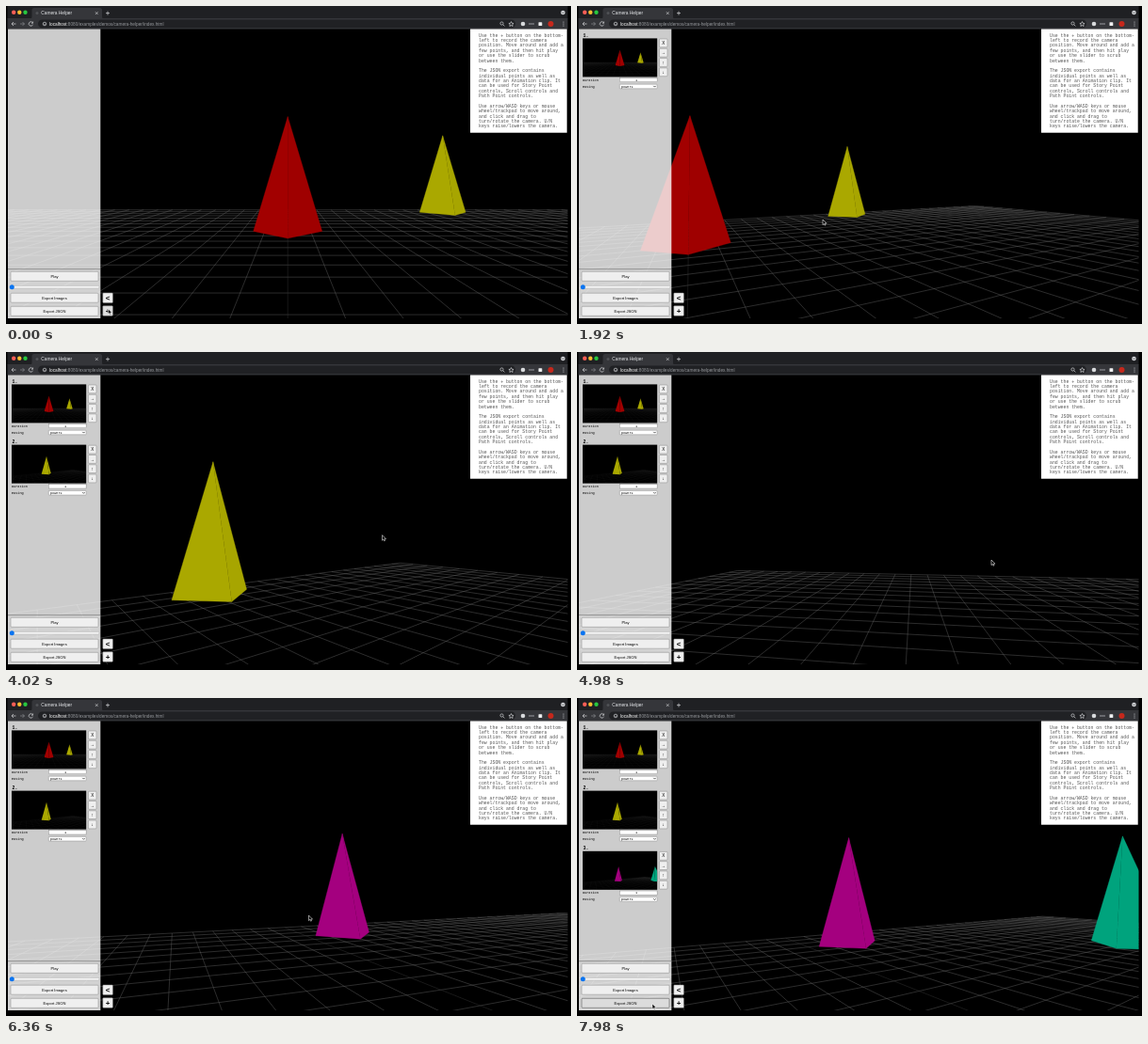
An HTML page for the animation above (8000 ms loop, 600 by 338 pixels).

```html
<!DOCTYPE html>
<html lang="en">
<head>
<meta charset="utf-8">
<title>Camera Helper</title>
<style>
  html, body { margin: 0; width: 100%; height: 100%; overflow: hidden; background: #000; }
  svg { display: block; width: 100vw; height: 100vh; }
  text { font-family: "Liberation Sans", Arial, sans-serif; white-space: pre; }
  .mono { font-family: "Liberation Mono", "Courier New", monospace; }
  .mid { text-anchor: middle; }
  .grid { fill: none; stroke: #636363; stroke-width: .45; }
  .axis { fill: none; stroke: #363636; stroke-width: .45; }
  .btn { fill: #efefef; stroke: #858585; stroke-width: .5; }
  .icon { fill: none; stroke: #d4d6d9; stroke-width: .7; }
</style>
</head>
<body>
<svg id="stage" viewBox="0 0 600 338">
  <defs>
    <clipPath id="view"><rect x="2" y="24.500" width="594.500" height="307.500"/></clipPath>
  </defs>
  <rect width="600" height="338" fill="#000"/>
  <g id="scene" clip-path="url(#view)"></g>

  <g id="chrome">
    <rect x="1.500" y="0" width="595" height="13.500" fill="#1f2023"/>
    <path d="M25 14Q27.500 14 27.500 11V4.500Q27.500 2 30 2H99.500Q102 2 102 4.500V11Q102 14 104.500 14Z" fill="#35363a"/>
    <rect x="1.500" y="13" width="595" height="11.500" fill="#35363a"/>
    <rect x="34" y="14.400" width="507" height="8.800" rx="4.400" fill="#202124"/>
    <circle cx="8.200" cy="6.700" r="2.200" fill="#ff5f57"/>
    <circle cx="14.300" cy="6.700" r="2.200" fill="#febc2e"/>
    <circle cx="20.500" cy="6.700" r="2.200" fill="#28c840"/>
    <circle cx="33" cy="7.500" r="1.500" fill="#505256"/>
    <text x="37.300" y="9.300" font-size="4.850" fill="#e8eaed">Camera Helper</text>
    <path class="icon" d="M95 6.300l2.600 2.600M97.600 6.300l-2.600 2.600M106 7.600h4M108 5.600v4"/>
    <path class="icon" d="M10.500 19h-4.500m2-2l-2 2 2 2M28.300 17.800a2.200 2.200 0 1 0 .2 1.900M28.600 16.500v1.700h-1.700"/>
    <path class="icon" stroke-opacity=".5" d="M15 19h4.500m-2-2l2 2-2 2"/>
    <circle class="icon" cx="41" cy="19" r="1.800"/>
    <path class="icon" d="M41 18.800v1.300"/>
    <text x="46" y="20.700" font-size="4.720" fill="#94979b"><tspan fill="#fff">localhost</tspan>:8080/examples/demos/camera-helper/index.html</text>
    <circle class="icon" cx="526.500" cy="18.500" r="1.600"/>
    <path class="icon" d="M527.700 19.700l1.700 1.700M536.500 16.600l.8 1.700 1.800.2-1.400 1.200.4 1.800-1.600-.9-1.600.9.4-1.800-1.400-1.200 1.800-.2Z"/>
    <circle cx="549" cy="19" r="2.300" fill="#d8dadc"/>
    <g fill="#c4c6c9">
      <circle cx="556" cy="19" r=".7"/><circle cx="558" cy="19" r=".7"/><circle cx="560" cy="19" r=".7"/>
      <circle cx="592" cy="17" r=".6"/><circle cx="592" cy="19" r=".6"/><circle cx="592" cy="21" r=".6"/>
    </g>
    <rect x="565.500" y="17.200" width="3.800" height="3.800" rx=".6" fill="#f0f1f2"/>
    <circle cx="578.500" cy="19" r="3" fill="#c6281c"/>
    <circle cx="591.500" cy="7" r="2.300" fill="#d0d2d5"/>
    <path d="M590.700 6.700l.8.8.8-.8" fill="none" stroke="#222" stroke-width=".7"/>
  </g>

  <g id="panel">
    <rect x="2" y="24.500" width="98.300" height="307.500" fill="#fff" fill-opacity=".8"/>
    <rect x="2" y="280" width="98.300" height="52" fill="#fff" fill-opacity=".12"/>
    <path d="M2 279.700H100.300" stroke="#666" stroke-width=".6"/>
    <rect x="5" y="297.400" width="94" height="2.600" rx="1.300" fill="#f4f4f4" stroke="#aaa" stroke-width=".4"/>
    <circle cx="6.300" cy="298.700" r="2.500" fill="#0a74f0"/>
  </g>
  <g id="items"></g>
  <g id="info"><rect x="493" y="24.500" width="102.700" height="110.200" fill="#fff"/></g>
  <path id="cursor" d="M0 0V5.600L1.300 4.400 2.100 6.200 3 5.800 2.200 4.100H4Z" fill="#000" stroke="#fff" stroke-width=".55"/>
</svg>

<script>
const NS = 'http://www.w3.org/2000/svg';
const $ = id => document.getElementById(id);
const LOOP = 8000, STEP = 60;
const FOCAL = 329, CX = 299.2, CY = 178.5, EYE = 5, RADIUS = 3, NEAR = 0.5;

// Ground coordinates: x to the right, z ahead of the first view.
const CONES = [
  { x: 0, z: 27, rgb: [162, 0, 0] },
  { x: 20.2, z: 40.4, rgb: [170, 168, 0] },
  { x: 43.7, z: -10.9, rgb: [164, 0, 127] },
  { x: 29.4, z: -32.1, rgb: [0, 163, 125] }
];
const GRID = { x0: -50, x1: 50, z0: -57, z1: 43, gap: 2 };

// Rows: time, then values.
const POSITION = [
  [1950, 0, 0], [2790, 9.93, 18.67], [5200, 9.93, 18.67],
  [6240, 16.5, 4.84], [6400, 16.5, 4.84], [7050, 18.2, 3.9]
];
const LOOK = [ // yaw in degrees, horizon height on the stage
  [720, 0, 178.5], [1020, 8.2, 175], [1750, 28.7, 185.8], [3850, 28.6, 185.3],
  [4400, 62, 190], [4650, 62, 190], [4980, 80, 194.5], [5460, 110, 197],
  [6400, 110, 197], [7000, 122, 204]
];
const POINTER = [
  [330, 108.5, 322], [700, 373, 204], [1020, 340, 189], [1750, 261, 227],
  [2400, 261, 227], [2820, 111.5, 322], [3620, 111.5, 322], [3850, 440, 190],
  [4400, 309, 205], [4650, 510, 213], [4980, 440, 221], [5460, 321.5, 231],
  [6400, 321.5, 231], [7000, 275, 259], [7050, 275, 259], [7360, 108, 322],
  [7560, 108, 322], [7860, 80, 325]
];
const ITEMS_AT = [300, 3060, 7440];
const HOVER_AT = 7860;

const linear = u => u;
const smooth = u => u * u * (3 - 2 * u);

function track(keys, t, ease = linear) {
  if (t <= keys[0][0]) return keys[0].slice(1);
  const i = keys.findIndex(k => k[0] > t);
  if (i < 0) return keys[keys.length - 1].slice(1);
  const a = keys[i - 1], b = keys[i];
  const u = ease((t - a[0]) / (b[0] - a[0]));
  return a.slice(1).map((v, j) => v + (b[j + 1] - v) * u);
}

function el(parent, tag, attrs = {}, text) {
  const node = document.createElementNS(NS, tag);
  for (const k in attrs) node.setAttribute(k, attrs[k]);
  if (text !== undefined) node.textContent = text;
  parent.append(node);
  return node;
}

function cameraAt(t) {
  const [x, z] = track(POSITION, t, smooth);
  const [deg, horizon] = track(LOOK, t);
  const yaw = deg * Math.PI / 180, pitch = Math.atan((horizon - CY) / FOCAL);
  return { x, z, sy: Math.sin(yaw), cy: Math.cos(yaw), sp: Math.sin(pitch), cp: Math.cos(pitch) };
}

function toCamera(c, x, y, z) {
  const dx = x - c.x, dz = z - c.z;
  const ahead = dx * c.sy + dz * c.cy;
  return [dx * c.cy - dz * c.sy, y * c.cp - ahead * c.sp, ahead * c.cp + y * c.sp];
}

const project = p => [CX + FOCAL * p[0] / p[2], CY - FOCAL * p[1] / p[2]];
const pair = p => p.map(v => v.toFixed(2)).join(' ');

function groundLine(c, x0, z0, x1, z1) {
  let a = toCamera(c, x0, -EYE, z0), b = toCamera(c, x1, -EYE, z1);
  if (a[2] < b[2]) [a, b] = [b, a];
  if (a[2] <= NEAR) return '';
  if (b[2] < NEAR) {
    const u = (a[2] - NEAR) / (a[2] - b[2]);
    b = a.map((v, i) => v + (b[i] - v) * u);
  }
  return `M${pair(project(a))}L${pair(project(b))}`;
}

function gridPaths(c) {
  const { x0, x1, z0, z1, gap } = GRID;
  let lines = '', axes = '';
  for (let k = 0; k <= x1 - x0; k += gap) {
    const d = groundLine(c, x0 + k, z0, x0 + k, z1) + groundLine(c, x0, z0 + k, x1, z0 + k);
    if (k === (x1 - x0) / 2) axes = d; else lines += d;
  }
  return [lines, axes];
}

// Side faces of a four-sided cone that turn towards the camera.
function coneFaces(c, cone) {
  const apex = toCamera(c, cone.x, EYE, cone.z);
  const base = [[0, -1], [1, 0], [0, 1], [-1, 0]].map(([x, z]) =>
    toCamera(c, cone.x + x * RADIUS, -EYE, cone.z + z * RADIUS));
  if ([apex, ...base].some(p => p[2] < NEAR)) return [];
  const top = project(apex), ring = base.map(project), faces = [];
  ring.forEach((p, i) => {
    const q = ring[(i + 1) % 4];
    const turn = (p[0] - top[0]) * (q[1] - top[1]) - (p[1] - top[1]) * (q[0] - top[0]);
    if (turn >= 0) return;
    const light = i === 0 ? 0.98 : 1;
    faces.push({
      d: `M${pair(top)}L${pair(p)}L${pair(q)}Z`,
      fill: `rgb(${cone.rgb.map(v => Math.round(v * light))})`
    });
  });
  return faces;
}

function makeScene(parent) {
  const grid = el(parent, 'path', { class: 'grid' });
  const axis = el(parent, 'path', { class: 'axis' });
  const slots = Array.from({ length: CONES.length * 2 }, () =>
    el(parent, 'path', { 'stroke-width': .3, 'stroke-linejoin': 'round' }));
  return c => {
    const [lines, axes] = gridPaths(c);
    grid.setAttribute('d', lines);
    axis.setAttribute('d', axes);
    const depth = o => toCamera(c, o.x, 0, o.z)[2];
    const faces = [...CONES].sort((a, b) => depth(b) - depth(a)).flatMap(o => coneFaces(c, o));
    slots.forEach((s, i) => {
      const f = faces[i] || { d: '', fill: 'none' };
      s.setAttribute('d', f.d);
      s.setAttribute('fill', f.fill);
      s.setAttribute('stroke', f.fill);
    });
  };
}

function button(parent, x, y, w, h, label, size, extra = {}) {
  const box = el(parent, 'rect', { class: 'btn', x, y, width: w, height: h, rx: .8 });
  el(parent, 'text', { class: 'mid', x: x + w / 2, y: y + h / 2 + size * .36, 'font-size': size, ...extra }, label);
  return box;
}

function makeItem(index) {
  const g = el($('items'), 'g', { transform: `translate(0 ${index * 64.2})` });
  const small = { class: 'mono', 'font-size': 3.5 };
  el(g, 'text', { class: 'mono', x: 6.5, y: 32.6, 'font-size': 4.8, 'font-weight': 700 }, `${index + 1}.`);
  el(g, 'rect', { x: 6, y: 34.4, width: 79.2, height: 41, fill: '#000' });
  const shot = el(g, 'g', { transform: 'translate(5.73 31.140) scale(.1331)' });
  makeScene(el(shot, 'g', { 'clip-path': 'url(#view)' }))(cameraAt(ITEMS_AT[index]));
  ['X', '→', '↑', '↓'].forEach((s, i) => button(g, 87.4, 35 + i * 10.3, 8.6, 8.8, s, 4.6));
  el(g, 'text', { ...small, x: 6, y: 80 }, 'Duration');
  el(g, 'text', { ...small, x: 6, y: 86.7 }, 'Easing');
  el(g, 'rect', { x: 45.3, y: 76.6, width: 39.8, height: 4.2, fill: '#fff', stroke: '#777', 'stroke-width': .4 });
  el(g, 'text', { ...small, x: 62, y: 79.9 }, '1');
  el(g, 'rect', { x: 45.3, y: 83.2, width: 39.8, height: 4.6, rx: .6, fill: '#fff', stroke: '#777', 'stroke-width': .4 });
  el(g, 'text', { ...small, x: 47, y: 86.6 }, 'power1');
  el(g, 'path', { d: 'M81.300 84.900l1.200 1.200 1.200-1.200', fill: 'none', stroke: '#111', 'stroke-width': .7 });
  return g;
}

const INFO = `Use the + button on the bottom-
left to record the camera
position. Move around and add a
few points, and then hit play
or use the slider to scrub
between them.

The JSON export contains
individual points as well as
data for an Animation clip. It
can be used for Story Point
controls, Scroll controls and
Path Point controls.

Use arrow/WASD keys or mouse
wheel/trackpad to move around,
and click and drag to
turn/rotate the camera. U/N
keys raise/lowers the camera.`;

INFO.split('\n').forEach((line, i) => el($('info'), 'text',
  { class: 'mono', x: 502, y: 32.7 + i * 5.37, 'font-size': 4.84, fill: '#555' }, line));

const panel = $('panel');
button(panel, 5, 282.3, 93, 10, 'Play', 4.1);
button(panel, 5, 305.2, 93, 10, 'Export Images', 4.1);
const exportBox = button(panel, 5, 319.3, 93, 10, 'Export JSON', 4.1);
button(panel, 102.8, 305, 10.6, 10.6, '<', 8, { 'font-weight': 700 });
const plusBox = button(panel, 102.8, 318.7, 10.6, 10.6, '+', 8, { 'font-weight': 700 });

const items = ITEMS_AT.map((_, i) => makeItem(i));
const drawScene = makeScene($('scene'));

function render(t) {
  drawScene(cameraAt(t));
  items.forEach((g, i) => g.setAttribute('display', t >= ITEMS_AT[i] ? 'inline' : 'none'));
  const [x, y] = track(POINTER, t);
  $('cursor').setAttribute('transform', `translate(${x} ${y})`);
  const overPlus = x > 102 && x < 114 && y > 318;
  plusBox.style.fill = overPlus ? '#dedede' : '';
  exportBox.style.fill = t >= HOVER_AT ? '#dcdcdc' : '';
  exportBox.style.stroke = t >= HOVER_AT ? '#444' : '';
}

const start = performance.now();
function frame() {
  const t = (performance.now() - start) % LOOP;
  render(Math.floor(t / STEP) * STEP);
  requestAnimationFrame(frame);
}
frame();
</script>
</body>
</html>
```
